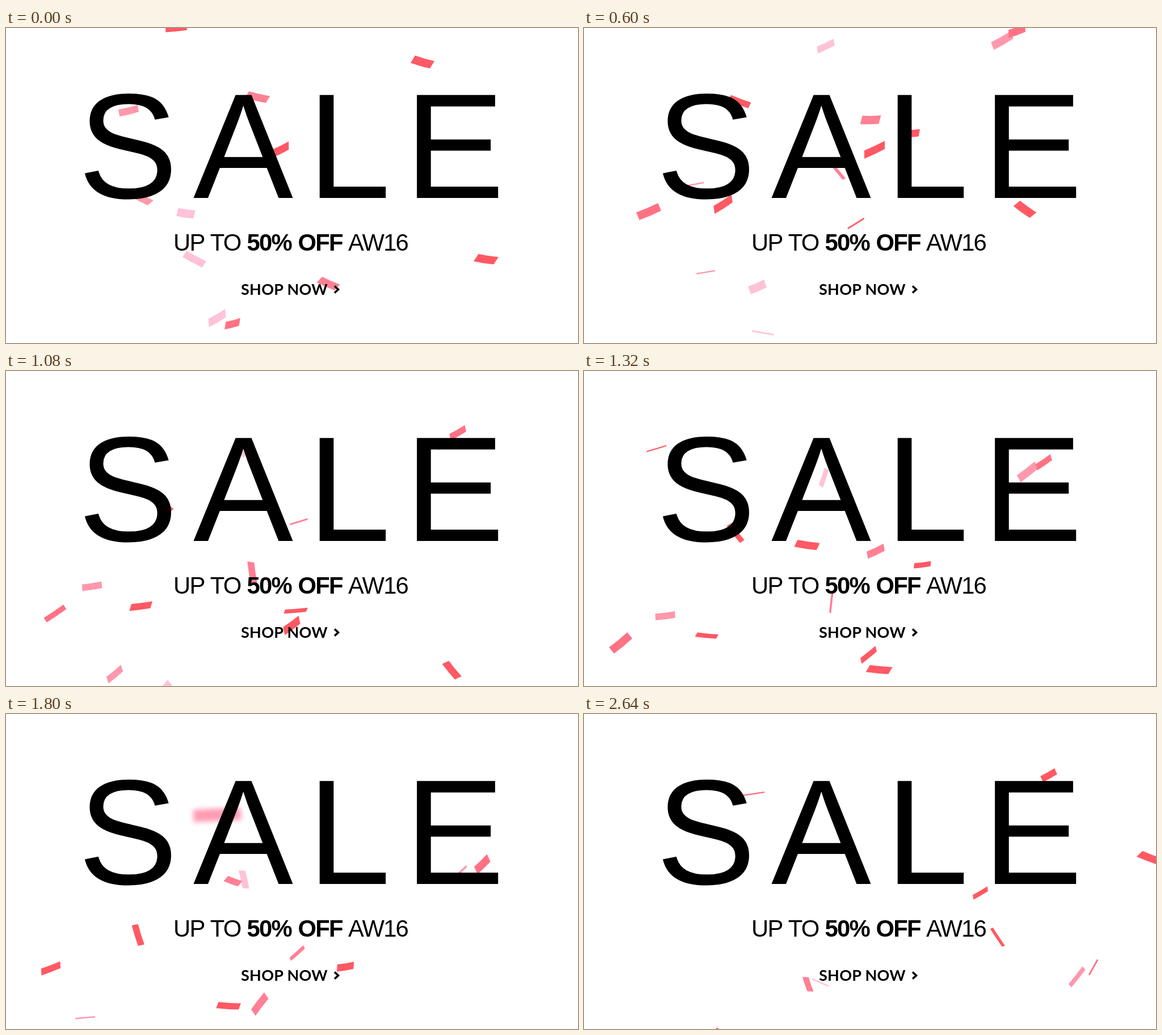
These frames come from a looping animation (1008x556 px, 2.7 s). An HTML page with a canvas:

```html
<!DOCTYPE html>
<html lang="en">
<head>
<meta charset="utf-8">
<title>Sale</title>
<style>
  html, body { margin: 0; width: 100%; height: 100%; overflow: hidden; background: #fff; }
  canvas, svg { position: absolute; left: 0; top: 0; width: 1008px; height: 556px; }
  .sale { font: 264px "Liberation Sans", Arial, sans-serif; text-anchor: middle; }
  .offer { font: 41.8px "Liberation Sans", Arial, sans-serif; letter-spacing: -1.8px; word-spacing: 2px; }
  .offer .bold { font-weight: 700; }
  .shop { font: 700 27px Lato, sans-serif; letter-spacing: .3px; }
</style>
</head>
<body>
<canvas id="stage" width="1008" height="556"></canvas>
<svg viewBox="0 0 1008 556">
  <g class="sale">
    <text x="215" y="300">S</text>
    <text x="418" y="300">A</text>
    <text x="604.5" y="300">L</text>
    <text x="790.5" y="300">E</text>
  </g>
  <g class="offer">
    <text x="295" y="393">UP TO</text>
    <text class="bold" x="424.5" y="393">50% OFF</text>
    <text x="603" y="393">AW16</text>
  </g>
  <text class="shop" x="414" y="471">SHOP NOW</text>
  <path d="M579 455.5L585.5 461.5L579 467.5" fill="none" stroke="#000" stroke-width="3.6"/>
</svg>
<script>
const STEP = 60, STEPS = 45;
const FAR = 13, NEAR = 26; // falling speed in pixels per step
const TONES = ['#ffc2d8', '#ff98ac', '#ff8094', '#ff7284', '#ff5964'];
const ctx = document.getElementById('stage').getContext('2d');
const papers = [];

// Repeatable noise between 0 and 1
function noise(seed, salt) {
  const n = Math.sin(seed * 12.9898 + salt * 78.233) * 43758.5453;
  return n - Math.floor(n);
}

// Papers that are at the given points at one step of the loop
function wave(step, speed, ...points) {
  for (const [x, y] of points) {
    const seed = papers.length + 1;
    papers.push({
      step, speed, x, y,
      width: 26 + 16 * noise(seed, 1),
      height: 11 + 4 * noise(seed, 2),
      angle: 1.2 * (noise(seed, 3) - .5),
      spin: .14 * (noise(seed, 4) - .5),
      slant: -.5 * noise(seed, 5),
      tumble: .15 + .2 * noise(seed, 6),
      sway: 30 * (noise(seed, 7) - .5),
      tone: speed === NEAR ? TONES[4] : TONES[Math.floor(5 * noise(seed, 8))]
    });
  }
}

wave(0, FAR, [300, 0], [216, 146], [240, 301], [317, 327], [332, 408], [443, 122],
  [483, 215], [568, 451], [372, 512], [399, 522]);
wave(0, NEAR, [734, 60], [846, 408]);
wave(10, FAR, [426, 32], [737, 22], [763, 5], [505, 162], [576, 186], [114, 324], [245, 311]);
wave(10, NEAR, [512, 215]);
wave(22, NEAR, [393, 307]);
wave(30, FAR, [400, 295], [79, 449]);
wave(38, FAR, [305, 63], [674, 238]);
wave(38, NEAR, [701, 238]);
wave(44, FAR, [819, 108]);
wave(44, NEAR, [998, 254]);

function drawPaper(p, step) {
  const age = step - p.step;
  const drag = age < 0 ? 3 : 1; // quick entry, then slowed by the air
  const y = p.y + p.speed * drag * age;
  if (y < -40 || y > 600) return;
  const spread = (p.x - 450) / 80;
  const x = p.x + spread * age + p.sway * Math.sin(age * .25);
  const w = p.width / 2;
  const h = p.height / 2 * Math.max(.2, Math.abs(Math.cos(p.tumble * age)));

  ctx.save();
  ctx.translate(x, y);
  ctx.rotate(p.angle + p.spin * age);
  ctx.transform(1, 0, p.slant, 1, 0, 0);
  ctx.fillStyle = p.tone;
  ctx.beginPath();
  ctx.moveTo(-w, -h);
  ctx.quadraticCurveTo(0, -.85 * h, w, -h);
  ctx.lineTo(w, h);
  ctx.quadraticCurveTo(0, 1.15 * h, -w, h);
  ctx.fill();
  ctx.restore();
}

// One soft paper rushes past close to the lens
function drawBlurred(step) {
  const age = step - 30;
  ctx.save();
  ctx.filter = 'blur(4px)';
  ctx.fillStyle = '#ff9cb4';
  ctx.translate(372 + 4 * age, 178 + 55 * age);
  ctx.rotate(-.05 + .04 * age);
  ctx.fillRect(-42, -11, 84, 22);
  ctx.restore();
}

function render(now) {
  const step = Math.floor(now / STEP) % STEPS;
  ctx.clearRect(0, 0, 1008, 556);
  ctx.filter = 'blur(.6px)';
  papers.forEach(paper => drawPaper(paper, step));
  drawBlurred(step);
}

const start = performance.now();
function tick() {
  render(performance.now() - start);
  requestAnimationFrame(tick);
}
tick();
</script>
</body>
</html>
```
